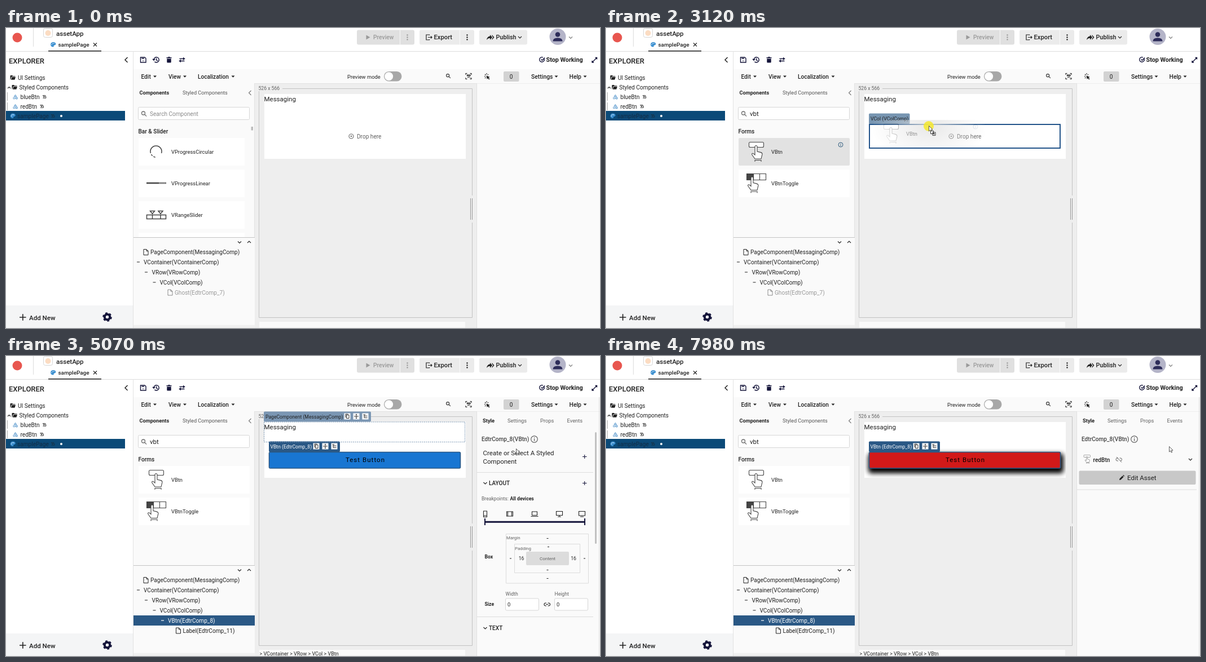
An HTML page that plays this animation: 1053 by 532 pixels, repeating every 8000 ms.

```html
<!DOCTYPE html>
<html lang="en">
<head>
<meta charset="utf-8">
<title>Page editor</title>
<style>
  html, body { margin: 0; width: 100%; height: 100%; overflow: hidden; background: #fff; }
  svg { display: block; width: 1053px; height: 532px; font: 10.08px Roboto, sans-serif; fill: #212121; }
  text { white-space: pre; }
  .md { font-weight: 500; }
  .b { font-weight: 700; }
  .s7 { font-size: 7.92px; }
  .s8 { font-size: 8.64px; }
  .s9 { font-size: 9.36px; }
  .s10 { font-size: 10.8px; }
  .s11 { font-size: 11.52px; }
  .mid { text-anchor: middle; }
  .grey { fill: #616161; }
  .ln { fill: none; }
  .ln:where(:not([stroke])) { stroke: #222; }
  .ln:where(:not([stroke-width])) { stroke-width: 1.1; }
  .navy { stroke: #14143a; }
  .edge { fill: none; }
  .edge:where(:not([stroke])) { stroke: #dcdcdc; }
  .field { fill: #fff; stroke: #d6d6d6; }
  .off { display: none; }
</style>
</head>
<body>
<svg viewBox="0 0 1053 532">
  <defs>
    <path id="down" class="ln" d="M-3-1.5 0 1.5 3-1.5"/>
    <path id="tri" d="M-3-1.5H3L0 1.7Z"/>
    <path id="file" class="ln" stroke-width="1" d="M-4-5H1L4-2V5H-4ZM1-5V-2H4"/>
    <path id="folder" d="M-4.5-3.2q0-.8.8-.8H-.8L.2-2.8H4.5V-1.7H-2L-4 3.6H-4.5ZM-1.4-.9H5L3.4 3.7H-3.1Z"/>
    <g id="part" fill="none" stroke="#3c86c4" stroke-width=".9">
      <path d="M0-3.6 2-.6H-2Z"/><circle cx="-2.2" cy="2.4" r="1.5"/><path d="M.8 1H3.6V3.8H.8Z"/>
    </g>
    <path id="jump" class="ln" stroke-width=".9" d="M-2.8-2.3H1.8V.3M-2.8-2.3 0 .2M-2.6 2.3H2.8V-.6M0-1.2V.5H-1.8"/>
    <g id="palette">
      <path fill="#3b8fd0" d="M0-4.4C6-4.4 5.6 1 2.8 1 .6 1 1.6 2.4 1 3.6.4 4.8-4.4 4-4.4 0-4.4-2.6-2.4-4.4 0-4.4Z"/>
      <g fill="#fff"><circle cx="-2.4" r=".7"/><circle cx="-1" cy="-2.3" r=".7"/><circle cx="1.4" cy="-2.2" r=".7"/></g>
    </g>
    <g id="dots"><circle cy="-4" r="1.2"/><circle r="1.2"/><circle cy="4" r="1.2"/></g>
    <g id="lens" fill="none" stroke="#333" stroke-width="1.3"><circle cx="-1" cy="-1" r="3"/><path d="M1.2 1.2 4.6 4.6"/></g>
    <g id="hand" stroke="#444" stroke-width="1.1" fill="#fff">
      <path d="M264 222V210.500a2 2 0 0 1 4 0V219l6.500 1.600q2.800.8 2.400 3.600L275 232H264l-5-7q-1.200-3 1.600-2.800L264 225Z"/>
      <path d="M264 237V234.500H275V237" fill="none"/>
    </g>
    <g id="btnIcon"><rect x="253.500" y="202.500" width="26" height="9" rx="2" fill="#fff" stroke="#444" stroke-width="1.100"/><use href="#hand"/></g>
    <g id="info" fill="none"><circle r="4"/><path d="M0-.7V2.300M0-2.400V-1.500"/></g>
    <g id="tools">
      <path fill="#fff" d="M0 0H11V11H0ZM16 0H27V11H16ZM32 0H43V11H32Z"/>
      <path class="ln" stroke-width=".9" d="M4 3H8.500V9H4ZM2.500 7.500V1.500H7M21.500 1.500V9.500M17.500 5.500H25.500M20.300 2.700 21.500 1.500 22.700 2.700M20.300 8.300 21.500 9.500 22.700 8.300M34 2.500H38M35.500 2.500V8H41M35.500 5H41"/>
    </g>
    <g id="dragCard">
      <rect x="235" y="195" width="197" height="49" rx="2" fill="#e2e2e2"/>
      <use href="#btnIcon"/><text x="293" y="222.500" class="s9">VBtn</text>
      <use href="#info" x="416" y="207" stroke="#345f80"/>
    </g>
    <radialGradient id="fade" gradientUnits="userSpaceOnUse" cx="0" cy="0" r="1" gradientTransform="translate(334 206) scale(104 62)">
      <stop offset="0" stop-color="#fff" stop-opacity=".8"/>
      <stop offset=".6" stop-color="#fff" stop-opacity=".3"/>
      <stop offset="1" stop-color="#fff" stop-opacity="0"/>
    </radialGradient>
    <mask id="ghostMask"><rect x="235" y="195" width="197" height="49" fill="url(#fade)"/></mask>
    <clipPath id="page"><rect x="458" y="117" width="357" height="99"/></clipPath>
    <clipPath id="list"><rect x="226" y="170" width="215" height="201"/></clipPath>
    <filter id="soft" x="-10%" y="-80%" width="120%" height="260%"><feGaussianBlur stdDeviation="4.500"/></filter>
  </defs>

  <!-- header -->
  <path d="M0 0H1053V532H0Z" fill="#fff"/>
  <circle cx="20" cy="17" r="8.500" fill="#e8564f"/>
  <path class="edge" d="M48.500 0V33M0 41.500H1053"/>
  <rect class="field" x="66.500" y=".5" width="16" height="16" rx="3"/>
  <circle cx="74.500" cy="9" r="5" fill="#fbdcc2"/>
  <text x="89" y="14" class="s11 md">assetApp</text>
  <use href="#palette" x="83.500" y="29.500"/>
  <text x="92.500" y="33" class="md" font-size="9.900">samplePage</text>
  <path class="ln" d="M155 26.500 161 32.500M161 26.500 155 32.500"/>
  <path d="M75 40H169V41.500H75Z"/>
  <rect x="622" y="3.500" width="102" height="26" rx="3" fill="#e0e0e0"/>
  <rect x="733" y="3.500" width="97" height="26" rx="3" fill="#ebebeb"/>
  <rect x="839" y="3.500" width="85" height="26" rx="3" fill="#ebebeb"/>
  <path d="M698.500 3.500V29.500M804.500 3.500V29.500" stroke="#fafafa"/>
  <g fill="#9a9a9a"><path d="M638.500 12.500V20.500L645.500 16.500Z"/><text x="651" y="20" class="md" font-size="10.300">Preview</text><use href="#dots" x="711.500" y="16.500"/></g>
  <path class="ln" stroke-width="1.200" d="M750.500 13V12H745V21H750.500V20M748 16.500H755M753 14.500 755 16.500 753 18.500"/>
  <text x="758.500" y="20" class="md" font-size="11.200">Export</text><use href="#dots" x="817.500" y="16.500"/>
  <path d="M852 21Q853 15 858 14.500V12L862 16.500 858 21V18Q854.500 17.500 852 21ZM861.500 12 865.500 16.500 861.500 21V19L863.500 16.500 861.500 14Z"/>
  <text x="868.500" y="20" class="s10 md">Publish</text><use href="#down" x="911" y="16.500"/>
  <circle cx="978" cy="15.500" r="14.500" fill="#b4b4c8"/>
  <g fill="#2d2c59"><circle cx="978" cy="11.500" r="4.300"/><path d="M969.500 23.500Q969.500 17.500 978 17.500T986.500 23.500Z"/></g>
  <use href="#down" x="1001" y="17" opacity=".6"/>

  <!-- explorer -->
  <text x="5" y="63" class="md" font-size="12.960">EXPLORER</text>
  <path class="ln" stroke-width="1.500" d="M215.500 52 211 56.500 215.500 61"/>
  <use href="#folder" x="12" y="88"/><text x="21" y="92">UI Settings</text>
  <path class="ln" d="M3 107 5.500 104.500 8 107"/>
  <use href="#folder" x="15" y="105"/><text x="23.500" y="109">Styled Components</text>
  <path class="edge" d="M2.500 114V129M2.500 132V146" stroke="#aaa"/>
  <use href="#part" x="16.500" y="122"/><text x="25.500" y="126">blueBtn</text><use href="#jump" x="68" y="122"/>
  <use href="#part" x="16.500" y="139"/><text x="25.500" y="143">redBtn</text><use href="#jump" x="63.500" y="139"/>
  <rect y="147" width="211" height="17" fill="#0b4a78"/>
  <use href="#palette" x="12" y="156"/><text x="20" y="159.500" fill="#122c45">samplePage</text>
  <use href="#jump" x="83" y="156" opacity=".6"/><circle cx="98" cy="156" r="2" fill="#fff"/>
  <path d="M0 492H225V532H0Z" fill="#f4f5f6"/>
  <path class="ln" stroke-width="1.600" d="M24 513H35.500M29.800 507.200V518.800"/>
  <text x="41" y="517.500" class="s11 md">Add New</text>
  <g transform="translate(179.500 512.500)" fill="none" stroke="#14143a"><circle r="4.700" stroke-width="4"/><circle r="7.200" stroke-width="2.200" stroke-dasharray="3.770"/></g>

  <!-- toolbars -->
  <path d="M226 73H1053V98H226Z" fill="#fafafa"/>
  <g class="ln navy" stroke-width="1.400">
    <path d="M238.500 52H246L248 54V61H238.500ZM240.500 54H245M243 57.500V59"/>
    <path d="M262 56.500a4.600 4.600 0 1 1 1.400 3.200M260 55 262 57.300 264 55M266.500 53.500V56.800L269 58"/>
    <path d="M307.500 54.500H316M314 52.500 316.500 54.500 314 56.500M316.500 58.500H308M310 56.500 307.500 58.500 310 60.500"/>
    <path d="M954 54.500a4.300 4.300 0 1 1-2-2.300M948.500 55.500 950.500 57.500 955 52.500"/>
    <path d="M1044.500 52.500H1047.500V55.500M1047.500 52.500 1039.500 60.500M1039 58V61H1042"/>
  </g>
  <path fill="#14143a" d="M284.500 52H287L288 51H290L291 52H293.500V53.500H284.500ZM285.300 54.500H292.700V60.500Q292.700 61.500 291.700 61.500H286.300Q285.300 61.500 285.300 60.500Z"/>
  <text x="957.500" y="59.500" class="s10 b">Stop Working</text>
  <g class="md">
    <text x="239.500" y="89.500">Edit</text><use href="#tri" x="264" y="86"/>
    <text x="288" y="89.500">View</text><use href="#tri" x="317" y="86"/>
    <text x="340" y="89.500">Localization</text><use href="#tri" x="402.500" y="86"/>
    <text x="931" y="89.500" font-size="10.400">Settings</text><use href="#tri" x="975.500" y="86"/>
    <text x="998.500" y="89.500" font-size="10.400">Help</text><use href="#tri" x="1026.500" y="86"/>
  </g>
  <text x="605" y="89.500" class="s9">Preview mode</text>
  <rect x="670" y="77" width="31.500" height="17.500" rx="8.700" fill="#a8a8a8"/><circle cx="678.700" cy="85.700" r="7.500" fill="#fff"/>
  <use href="#lens" transform="translate(784 85) scale(.85)"/>
  <path class="ln" d="M815 83V80.500H817.500M822.500 80.500H825V83M825 88V90.500H822.500M817.500 90.500H815V88M817.500 83H819.500V85H817.500ZM821 83H823V85H821ZM818 88 822 86.500M822 88.500H823.500"/>
  <path d="M851.500 84.500 858 87 855.500 88 857.500 90.500 856 91.500 854.300 89 852.800 91Z"/><path class="ln" d="M852 80V82.500M848 85.500H850M849 82 850.500 83.500M855 82 854 83.500M849 89 850.500 87.500"/>
  <rect x="882" y="77" width="27.500" height="18" rx="2" fill="#d2d2d2"/><text x="895.500" y="89.500" class="mid">0</text>

  <!-- component panel -->
  <path d="M226 98H441V526H226Z" fill="#fafafa"/>
  <path d="M226 526.500H441V532H226Z" fill="#f0f0f0"/>
  <text x="236.500" y="118" class="b" font-size="9.200">Components</text>
  <text x="313" y="118" font-size="9.200" fill="#555">Styled Components</text>
  <path class="ln" d="M434.500 111 430.500 115 434.500 119" stroke="#777"/>
  <rect class="field" x="234.500" y="140.500" width="197" height="22" rx="2"/>
  <use href="#lens" x="244.500" y="152" opacity=".7"/>
  <text x="255" y="155.500" fill="#8a8a8a" data-t="0 1820">Search Component</text>
  <text id="query" x="255" y="156" class="s11"></text>
  <path id="caret" d="M0 145V159" stroke="#222"/>

  <g data-t="0 2080" clip-path="url(#list)">
    <text x="234.500" y="187" class="md">Bar &amp; Slider</text>
    <path fill="#fff" d="M235 195H423V244H235ZM235 251H423V300H235ZM235 307H423V356H235ZM235 363H423V412H235Z"/>
    <path d="M434.500 175H438V181.500H434.500Z" fill="#bcbcbc"/>
    <g class="ln" stroke="#444" stroke-width="1.500">
      <path d="M256.500 222A10 10 0 1 1 275.500 222"/><path d="M257.500 224A10 10 0 0 0 266 229.300" stroke-dasharray="3.500 2"/>
      <path d="M249 275H284" stroke-width="2.600"/><path d="M271 275H283.500" stroke="#aaa" stroke-width="1.200"/>
      <path d="M249.500 331.500H283.500V338.500H249.500ZM259.500 331.500V338.500M274 331.500V338.500M255.500 324.500H263.500L259.500 329.500ZM270 324.500H278L274 329.500Z"/>
    </g>
    <g class="s9"><text x="293" y="222.500">VProgressCircular</text><text x="293" y="278.500">VProgressLinear</text><text x="293" y="334.500">VRangeSlider</text></g>
  </g>
  <g data-t="2080 8000">
    <text x="234.500" y="187" class="md">Forms</text>
    <path fill="#fff" d="M235 195H432V244H235ZM235 251H432V300H235Z"/>
    <use href="#btnIcon"/><text x="293" y="222.500" class="s9">VBtn</text>
    <use href="#dragCard" data-t="2450 3820"/>
    <path d="M249.500 258.500H283.500V269.500H249.500ZM261.500 258.500V269.500M272.500 258.500V269.500" fill="#fff" stroke="#444" stroke-width="1.100"/>
    <path d="M249.500 258.500H261.500V269.500H249.500Z" fill="#444"/>
    <use href="#hand" x="-7" y="55.500"/><text x="293" y="278.500" class="s9">VBtnToggle</text>
  </g>

  <!-- component tree -->
  <path d="M226 371.500H441" stroke="#c4c4c4"/>
  <use href="#down" x="414" y="380"/><use href="#down" transform="translate(431 379.500) scale(1 -1)"/>
  <rect x="226" y="460" width="215" height="18" fill="#2a5885" data-t="4590 8000"/>
  <path class="ln" d="M232 415H237M246 433H251M260.500 451H265.500"/>
  <use href="#file" x="248" y="397.500"/><text x="256" y="401">PageComponent(MessagingComp)</text>
  <text x="244" y="419">VContainer(VContainerComp)</text>
  <text x="258.500" y="437">VRow(VRowComp)</text>
  <text x="272.500" y="455">VCol(VColComp)</text>
  <g data-t="0 3820" fill="#999"><use href="#file" x="291" y="469" opacity=".5"/><text x="299" y="473">Ghost(EdtrComp_7)</text></g>
  <g data-t="3820 8000">
    <g data-t="3820 4590"><path class="ln" d="M275 469H280"/><text x="287" y="473">VBtn(EdtrComp_8)</text></g>
    <g data-t="4590 8000" fill="#fff"><path d="M275 468.400H280V469.600H275Z"/><text x="287" y="473">VBtn(EdtrComp_8)</text></g>
    <use href="#file" x="305.500" y="487"/><text x="313.500" y="491">Label(EdtrComp_11)</text>
  </g>

  <!-- canvas -->
  <path d="M441 98H834V532H441Z" fill="#eee"/>
  <path d="M441 98.500H1053M834.500 98V532M225.500 41V532M440.500 98V371" stroke="#e2e2e2"/>
  <path d="M490 107.500H826.500V297M826.500 345V513.500H448.500V112" fill="none" stroke="#c2c2c2"/>
  <text x="447.500" y="110" class="s8 grey">526 x 566</text>
  <path d="M823.500 302V340M826.500 302V340" stroke="#999"/>
  <path d="M449 521H814V531.500H449Z" fill="#fafafa"/>
  <text x="449.500" y="531" font-size="9" data-t="3820 8000">&gt; VContainer &gt; VRow &gt; VCol &gt; VBtn</text>
  <rect x="458" y="117" width="357" height="115" fill="#fff" data-t="0 3500"/>
  <rect x="458" y="117" width="357" height="99" fill="#fff" data-t="3500 8000"/>
  <text x="457.500" y="130" class="s11">Messaging</text>

  <g data-t="2920 3500">
    <rect x="466" y="151.500" width="72.500" height="19" rx="2" fill="#7795b1"/><text x="469" y="164" class="s8">VCol (VColComp)</text>
    <rect x="467" y="171" width="338" height="42" fill="#fff" stroke="#23548a" stroke-width="2"/>
  </g>
  <g data-t="0 3500" class="grey">
    <circle cx="612" cy="192" r="4" class="ln" stroke="#666"/><path d="M610 191H614L612 193.500Z"/>
    <text x="622" y="196">Drop here</text>
  </g>

  <g data-t="3500 8000">
    <rect x="467" y="170.500" width="338.500" height="28.500" rx="3" fill="#1976d2"/>
    <g id="red" clip-path="url(#page)">
      <rect x="465" y="173" width="346" height="35" rx="5" fill="#000" filter="url(#soft)"/>
      <rect x="467" y="170.500" width="338.500" height="28.500" rx="3" fill="#d21919"/>
    </g>
    <text x="637" y="188" class="s11 mid" fill="#000" letter-spacing="1.030">Test Button</text>
    <rect x="466.500" y="170.500" width="339" height="28.500" rx="2" fill="none" stroke="#7a96b3" stroke-dasharray="2 1.500" data-t="3820 4590"/>
    <rect x="466.500" y="170.500" width="339" height="28.500" rx="2" fill="none" stroke="#2a5885" stroke-width="1.600" data-t="4590 8000"/>
    <g data-t="3820 8000">
      <rect x="466" y="151.500" width="126" height="18.500" rx="2" fill="#7a96b3"/>
      <rect x="466" y="151.500" width="126" height="18.500" rx="2" fill="#2a5885" data-t="4590 8000"/>
      <text x="468.500" y="164" class="s8" data-t="3820 4590">VBtn (EdtrComp_8)</text>
      <text x="468.500" y="164" class="s8" fill="#fff" data-t="4590 8000">VBtn (EdtrComp_8)</text>
      <use href="#tools" x="544.500" y="154.500"/>
    </g>
  </g>
  <g data-t="4860 5140">
    <rect x="457.500" y="117" width="356" height="35.500" fill="none" stroke="#7a96b3" stroke-dasharray="2 1.500"/>
    <rect x="457" y="98.500" width="190" height="18" rx="2" fill="#7a96b3"/>
    <text x="460" y="111" class="s8">PageComponent (MessagingComp)</text><use href="#tools" x="599.500" y="101.500"/>
  </g>

  <!-- properties -->
  <path d="M835 98.500H1053V532H835Z" fill="#fafafa"/>
  <g data-t="3820 8000">
    <path d="M1051.500 73V532" stroke="#e0e0e0"/>
    <g class="s9"><text x="845" y="118" class="b">Style</text><g class="grey"><text x="889" y="118">Settings</text><text x="947" y="118">Props</text><text x="994.500" y="118">Events</text></g></g>
    <text x="843" y="151" class="md" fill="#444">EdtrComp_8(VBtn)</text>
    <use href="#info" transform="translate(936.500 147.500) scale(1.450)" stroke="#444" stroke-width=".7"/>
  </g>
  <g data-t="3820 6430">
    <rect x="1044" y="135" width="3" height="198" rx="1.500" fill="#c1c1c1"/>
    <text x="845.500" y="176" class="s11">Create or Select A Styled</text><text x="845.500" y="191" class="s11">Component</text>
    <path class="ln navy" d="M1022 178.500H1029.500M1025.700 175V182M1022 225.500H1029.500M1025.700 222V229"/>
    <path d="M835 206.500H1041M835 462.500H1041" stroke="#ddd"/>
    <use href="#down" x="849.500" y="225.500"/><text x="856" y="229" class="md">LAYOUT</text>
    <g class="s8">
      <text x="843" y="256" class="grey">Breakpoints:</text><text x="893.500" y="256" class="b">All devices</text>
      <text x="848.500" y="359" class="b">Box</text><text x="848.500" y="443" class="b">Size</text>
      <text x="885.500" y="425" class="grey">Width</text><text x="972.500" y="425" class="grey">Height</text>
    </g>
    <path class="ln" d="M846.500 275H852.500V285.500H846.500ZM846.500 283H852.500M887.500 276H898.500V284H887.500ZM889.500 276V284M896.500 276V284M932.500 276H941.500V282.500H932.500ZM930.500 284.500H943.500M975.500 275.500H986.500V282.500H975.500ZM978 285H984M981 282.500V285M1015.500 275.500H1026.500V283H1015.500ZM1018 285H1024"/>
    <path class="ln navy" stroke-width="3" d="M849 294.300H1026"/><path class="ln navy" stroke-width="2" d="M849 288V300M1026 288V300"/>
    <path class="edge" d="M886.500 315.500H1032.500V403H886.500ZM901.500 333.500H1017.500V384.500H901.500Z"/>
    <rect x="922" y="347" width="76" height="24" rx="2" fill="#dcdcdc"/>
    <g class="s7 grey"><text x="887" y="325">Margin</text><text x="902" y="343.500">Padding</text><text x="960" y="361.500" class="mid">Content</text></g>
    <g class="s8 mid"><text x="913.500" y="362">16</text><text x="1006" y="362">16</text></g>
    <path class="ln" d="M958.500 323.500H961.500M960 338.500H963M958.500 379.500H961.500M958.500 394.500H961.500M893 359H896M1024 359H1027"/>
    <rect class="field" x="885.500" y="430" width="59" height="21" rx="2"/><rect class="field" x="972.500" y="430" width="59" height="21" rx="2"/>
    <text x="889" y="444" class="s9">0</text><text x="976" y="444" class="s9">0</text>
    <path class="ln" d="M958 438H956.500a2.500 2.500 0 0 0 0 5H958M960.500 438H962a2.500 2.500 0 0 1 0 5H960.500M957 440.500H961.500"/>
    <use href="#down" x="849.500" y="482.500"/><text x="856" y="486" class="md">TEXT</text>
  </g>
  <g data-t="5740 6430">
    <rect x="842.500" y="197.500" width="193" height="132" rx="2" fill="#fff" stroke="#999"/>
    <g class="s10 grey"><text x="851" y="216.500">CREATE NEW ASSET</text><text x="851" y="273.500">EXISTING ASSETS</text></g>
    <rect class="field" x="851.500" y="228.500" width="148" height="22" rx="2"/>
    <path class="ln" d="M1013 239 1016 242 1021.500 236"/>
    <rect x="843" y="282" width="192" height="19" fill="#e9edf1" data-t="5990 6430"/>
    <g class="s11"><text x="851" y="295.500">redBtn</text><text x="851" y="315">blueBtn</text></g>
  </g>
  <g data-t="6430 8000">
    <use href="#btnIcon" transform="translate(735.500 86.500) scale(.44)"/>
    <text x="863.500" y="187.500" class="md">redBtn</text>
    <path class="ln" stroke="#555" stroke-width=".9" d="M908 181H906.500a2.500 2.500 0 0 0 0 5H908M910.500 181H912a2.500 2.500 0 0 1 0 5M905 179 914 188.500"/>
    <use href="#down" x="1036" y="183.500"/>
    <rect x="838.500" y="203.500" width="207" height="24.500" rx="2" fill="#c8c8c8"/>
    <path d="M910 220 910.500 217.500 915.500 212.500 917.500 214.500 912.500 219.500ZM916.200 211.800 917 211Q918 210.800 919 213L918.200 213.800Z"/>
    <text x="924" y="220" class="s11">Edit Asset</text>
    <path d="M835 237H1047" stroke="#ddd"/>
  </g>

  <!-- pointer -->
  <g id="ghost"><use href="#dragCard" mask="url(#ghostMask)"/></g>
  <g id="pointer">
    <circle r="9" cy="1" fill="#f4e72c" opacity=".85" data-t="2640 3500"/>
    <path id="arrow" d="M.5.5V10L2.700 8 4.200 11.200 5.700 10.500 4.200 7.400 7 7.200Z" fill="#fff" stroke="#333" stroke-width=".8"/>
    <path id="beam" class="ln" d="M-2.500.5Q0 .5 0 2V8.500Q0 10 2.500 10M2.500.5Q0 .5 0 2M0 8.500Q0 10-2.500 10"/>
    <path data-t="2920 3500" d="M3.500 9.500H8.500V14.500H3.500ZM7 12H12V17.500H7ZM8.200 14.700H10.800M9.500 13.400V16" fill="#fff" stroke="#222" stroke-width=".9"/>
  </g>
</svg>
<script>
  const LOOP = 8000;
  const $ = id => document.getElementById(id);
  const show = (el, on) => el.classList.toggle('off', !on);
  const timed = [...document.querySelectorAll('[data-t]')].map(el => [el, ...el.dataset.t.split(' ').map(Number)]);

  // pointer stops: time, x, y
  const stops = [
    [110, 954, 505], [870, 356, 148], [2280, 356, 148], [2560, 333, 205], [2700, 333, 205],
    [3120, 572, 173], [3500, 566, 178], [3820, 566, 178], [4300, 538, 192], [4590, 538, 192],
    [5070, 904, 164], [5140, 926, 166], [5330, 926, 166], [5620, 1024, 177], [5750, 1024, 177],
    [6100, 889, 289], [6970, 889, 289], [7370, 597, 239], [7570, 597, 239], [7980, 998, 160]
  ];

  function pointerAt(t) {
    const i = stops.findIndex(s => s[0] > t);
    if (i < 1) return (i ? stops[stops.length - 1] : stops[0]).slice(1);
    const [a, b] = [stops[i - 1], stops[i]];
    const p = (t - a[0]) / (b[0] - a[0]), e = p * p * (3 - 2 * p);
    return [a[1] + (b[1] - a[1]) * e, a[2] + (b[2] - a[2]) * e];
  }

  function render(t) {
    for (const [el, from, to] of timed) show(el, t >= from && t < to);

    const [x, y] = pointerAt(t);
    const overSearch = x > 234 && x < 432 && y > 135 && y < 163;
    $('pointer').setAttribute('transform', `translate(${x} ${y})`);
    show($('pointer'), t >= 110);
    show($('beam'), overSearch);
    show($('arrow'), !overSearch);

    $('ghost').setAttribute('transform', `translate(${x - 333} ${y - 205})`);
    show($('ghost'), t >= 2700 && t < 3500);

    const typed = t < 1820 ? 0 : t < 2080 ? 1 : t < 2280 ? 2 : 3;
    $('query').textContent = 'vbt'.slice(0, typed);
    $('caret').setAttribute('transform', `translate(${[255.5, 261.5, 267.5, 271.5][typed]} 0)`);
    show($('caret'), (t >= 1040 && t < 1540) || (t >= 1820 && t < 2600));

    $('red').style.opacity = Math.min(1, Math.max(0, (t - 6400) / 170));
  }

  const start = performance.now();
  function tick() {
    render((performance.now() - start) % LOOP);
    requestAnimationFrame(tick);
  }
  tick();
</script>
</body>
</html>
```
